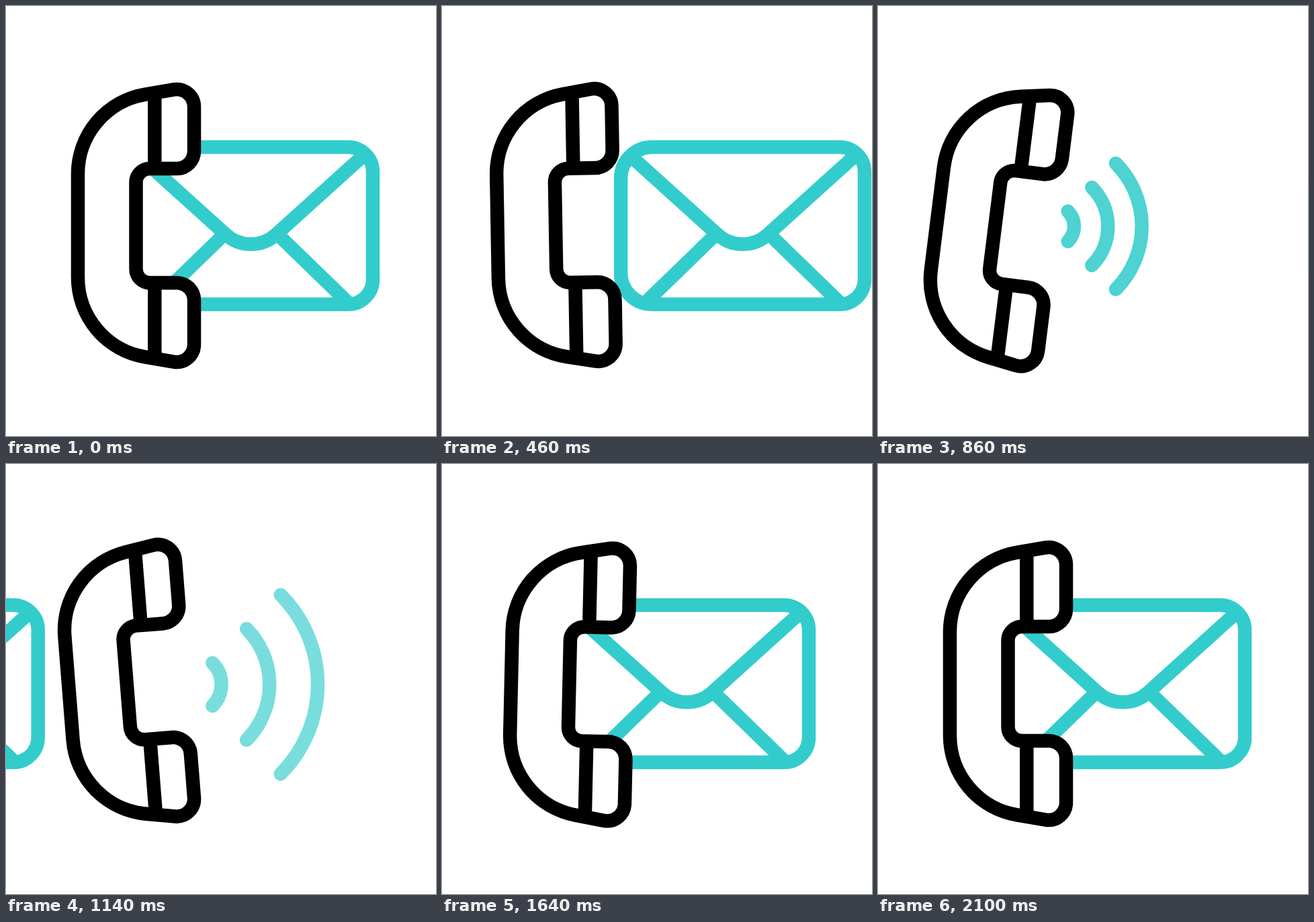
These frames come from a looping animation (640x640 px, 2.32 s). An HTML page:

```html
<!DOCTYPE html>
<html lang="en">
<head>
<meta charset="utf-8">
<title>Phone and mail</title>
<style>
  html, body { margin: 0; width: 100%; height: 100%; overflow: hidden; background: #fff; }
  svg { display: block; width: 100vw; height: 100vh; }
  #mail, #waves { fill: none; stroke: #33cccc; stroke-width: 20.5; }
  #waves { stroke-linecap: round; }
  #phone { fill: #fff; stroke: #000; stroke-width: 20.5; }
</style>
</head>
<body>
<svg viewBox="0 0 640 640">
  <g id="waves"><path/><path/><path/></g>
  <g id="mail">
    <path d="M229.7 210H509A37 37 0 0 1 546 247V407A37 37 0 0 1 509 444H229.7A46.5 46.5 0 0 1 183.2 397.5V256.5A46.5 46.5 0 0 1 229.7 210Z"/>
    <path d="M194 219.8L327.1 340.1A55.8 55.8 0 0 0 401.9 340.1L535 219.8"/>
    <path d="M325 339.5L219 442.4M404 339.5L510 442.4"/>
  </g>
  <g id="phone">
    <path d="M107 250A120 120 0 0 1 207.2 131.6L249.7 124.4A26 26 0 0 1 280 150V216A26 26 0 0 1 254 242H214A20.5 20.5 0 0 0 193.5 262.5V391.5A20.5 20.5 0 0 0 214 412H254A26 26 0 0 1 280 438V504A26 26 0 0 1 249.7 529.6L207.2 522.4A120 120 0 0 1 107 404Z"/>
    <path d="M221.3 132V242M221.3 412V522"/>
  </g>
</svg>
<script>
const LOOP = 2320, STEP = 20;
const phone = document.getElementById('phone');
const mail = document.getElementById('mail');
const waves = document.getElementById('waves');

// Tracks of [time, value]
const tilt = [[0, 0], [300, 10], [600, -10], [900, 8], [1200, -6], [1500, 4], [1800, -2], [2100, 0]];
const shift = [[0, 0], [300, -25], [2100, 0]];
const mailOut = [[300, 0], [900, 473]];
const mailIn = [[1000, -578], [1600, 0]];
const grow = [[600, 0.5], [1300, 1]];
const fade = [[600, 0], [900, 1], [1000, 1], [1400, 0]];

const smooth = u => u * u * (3 - 2 * u);
const linear = u => u;

function sample(track, t, ease = smooth) {
  if (t <= track[0][0]) return track[0][1];
  for (let i = 1; i < track.length; i++) {
    const [t0, a] = track[i - 1], [t1, b] = track[i];
    if (t <= t1) return a + (b - a) * ease((t - t0) / (t1 - t0));
  }
  return track[track.length - 1][1];
}

// Quarter arcs sharing one centre; the line weight stays constant while they grow
function drawWaves(t) {
  const k = sample(grow, t);
  const cx = 224.4 + 54.6 * k, cy = 328;
  [...waves.children].forEach((arc, i) => {
    const r = (48.4 + 76.8 * i) * k, d = r * Math.SQRT1_2;
    arc.setAttribute('d', `M${cx + d} ${cy - d}A${r} ${r} 0 0 1 ${cx + d} ${cy + d}`);
  });
  waves.setAttribute('opacity', sample(fade, t, linear));
}

function draw(t) {
  const x = sample(t < 1000 ? mailOut : mailIn, t);
  mail.setAttribute('transform', `translate(${x} 0)`);
  phone.setAttribute('transform',
    `translate(${sample(shift, t)} 0) rotate(${sample(tilt, t)} 193.5 327)`);
  drawWaves(t);
}

const start = performance.now();
function tick() {
  const t = (performance.now() - start) % LOOP;
  draw(Math.floor(t / STEP) * STEP);
  requestAnimationFrame(tick);
}
tick();
</script>
</body>
</html>
```
